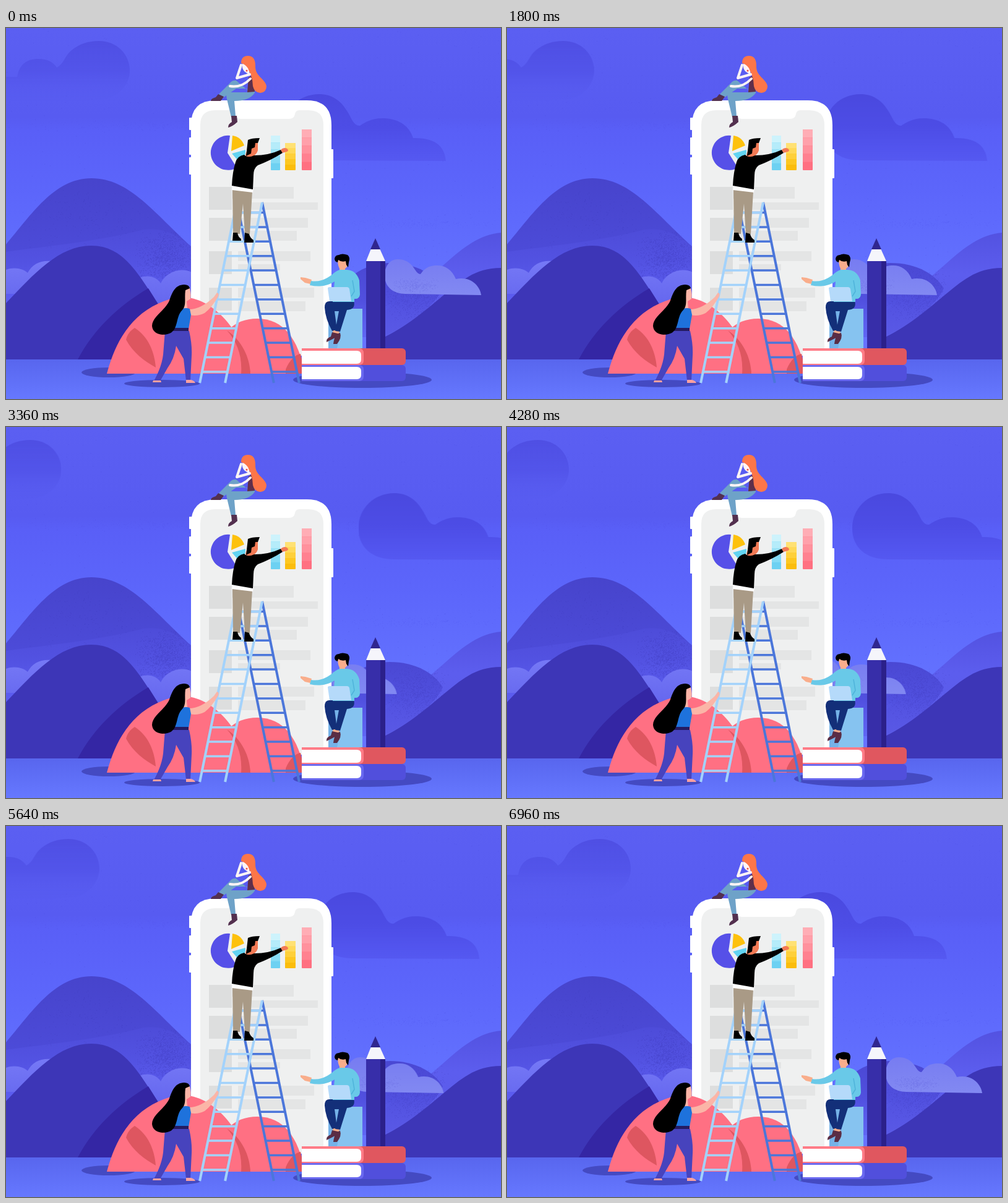
An HTML page that plays this animation: 800x600 px, repeating every 8080 ms.

```html
<!DOCTYPE html>
<html lang="en">
<head>
<meta charset="utf-8">
<title>Building a dashboard</title>
<style>
  html, body { margin: 0; width: 100%; height: 100%; overflow: hidden; background: #5c60f2; }
  svg { display: block; width: 800px; height: 600px; }
</style>
</head>
<body>
<svg id="stage" viewBox="0 0 800 600" xmlns="http://www.w3.org/2000/svg">
  <defs id="defs">
    <clipPath id="backLeftClip"><path d="M0 350C40 303 78 243 138 243C200 243 240 300 300 354V470H0Z"/></clipPath>
    <clipPath id="midRightClip"><path d="M800 331C750 337 722 370 690 397C668 376 600 373 560 402V520H800Z"/></clipPath>
  </defs>

  <rect width="800" height="540" fill="url(#sky)"/>
  <g id="skyGrain"></g>

  <g id="cloudLeft">
    <path fill="url(#leftFade)" d="M-40 118V88C-20 76 2 80 18 79C22 58 34 50 52 50C68 50 77 56 82 64C94 58 94 46 106 36C118 26 133 21 150 21C180 21 200 43 200 69C200 90 184 110 158 115L120 118Z"/>
  </g>
  <g id="cloudRight">
    <path fill="url(#rightFade)" d="M506 107C473 107 448 132 448 164C448 195 471 214 505 214L711 215C709 194 697 177 658 178C651 156 632 146 608 146C590 146 580 153 572 158C561 158 559 146 551 134C541 117 526 107 506 107Z"/>
  </g>

  <!-- back hills -->
  <path fill="url(#backLeft)" d="M0 350C40 303 78 243 138 243C200 243 240 300 300 354V470H0Z"/>
  <path fill="url(#haze)" d="M0 362C80 351 150 345 222 326C250 322 274 332 300 354V540H0Z"/>
  <g id="leftGrain" clip-path="url(#backLeftClip)"></g>
  <path fill="url(#backRight)" d="M800 331C765 334 738 356 712 379C676 411 640 440 600 465V536H800Z"/>
  <path fill="url(#midRight)" d="M526 440C550 398 585 380 620 380C662 380 692 398 706 421C690 455 640 490 600 500H526Z"/>
  <g id="rightGrain" clip-path="url(#midRightClip)"></g>
  <path fill="url(#puff)" d="M0 391C14 386 27 389 35 396C43 381 56 375 75 377L60 430H0Z"/>
  <path fill="url(#puff)" d="M216 404C231 398 245 404 250 413C258 396 280 386 300 395V450H240Z"/>

  <!-- front hills -->
  <path fill="#3d36b7" d="M0 445C45 398 85 352 138 352C190 352 214 398 245 445L300 536H0Z"/>
  <path fill="#3426a4" d="M116 536C140 490 180 450 230 421L245 445L290 536Z"/>
  <path fill="#3d36b7" d="M800 388C757 388 735 410 706 433C680 455 645 485 605 503L565 536H800Z"/>

  <g id="cloudSmall">
    <path fill="url(#smallFade)" d="M633 374C620 374 612 386 612 400C612 419 626 430 646 430L768 432C766 417 751 401 727 406C721 391 710 384 697 384C681 384 675 391 670 398C664 398 662 391 656 384C650 377 642 374 633 374Z"/>
    <g id="smallGrain"></g>
  </g>

  <rect y="536" width="800" height="64" fill="url(#ground)"/>
  <g fill="#444ac2">
    <ellipse cx="166" cy="557" rx="44" ry="8"/>
    <ellipse cx="252" cy="575" rx="61" ry="6"/>
    <ellipse cx="576" cy="569" rx="112" ry="13"/>
  </g>

  <!-- phone -->
  <g fill="#fff">
    <rect x="296" y="145" width="6" height="20" rx="1"/>
    <rect x="296" y="177" width="6" height="28" rx="1"/>
    <rect x="296" y="209" width="6" height="28" rx="1"/>
    <rect x="523" y="196" width="6" height="47" rx="1"/>
    <path d="M299 157Q299 117 339 117H486Q526 117 526 157V530H299Z"/>
  </g>
  <path fill="#eff0f0" d="M314 157Q314 133 338 133H363Q369 133 370 139Q371 147 380 147H457Q466 147 467 139Q468 133 474 133H489Q513 133 513 157V530H314Z"/>
  <g id="rows"></g>

  <!-- pie chart and bars -->
  <path fill="#5650e8" d="M362 174A28 28 0 1 0 373 226L358 202Z"/>
  <path fill="#fdc10d" d="M366 174Q380 176 385 190L364 199Z"/>
  <path fill="#62d3f1" d="M365 203L387 197Q388 209 378 218Z"/>
  <g id="bars"></g>

  <!-- pink hills -->
  <path fill="#ff7083" d="M163 559C176 510 203 452 275 436C330 428 384 490 396 559Z"/>
  <path fill="#ff7083" d="M358 490C370 476 387 470 406 470C450 470 473 505 483 559H380Z"/>
  <g fill="#de5660">
    <path d="M208 485C200 490 196 496 194 504C205 525 224 539 242 549C240 524 230 499 208 485Z"/>
    <path d="M357 489C374 508 382 531 380 559H395C394 529 378 503 357 489Z"/>
    <path d="M452 552C458 537 468 528 476 527L483 559H452Z"/>
  </g>

  <!-- ladder -->
  <g id="ladderBack" stroke="#4b76da" stroke-width="4"></g>
  <g id="ladderFront" stroke="#a3d2fb" stroke-width="4"></g>

  <!-- worker on the ladder -->
  <path fill="#a99a86" d="M366 260L398 264L394 333H386L383 284L378 333H367Z"/>
  <path d="M367 331H374Q375 338 380 341V344H366ZM386 331L393 333Q394 339 400 343V347H385Z"/>
  <path fill="#fff" d="M366 253L400 259L399 266L365 262Z"/>
  <path fill="#f27a55" d="M393 188L407 181V198Q405 204 400 207L389 211L387 205Z"/>
  <path d="M391 181Q397 178 410 178L407 186H403L402 193L397 195L396 203L388 207Z"/>
  <path d="M385 205Q391 211 401 206Q425 206 444 197L447 202Q428 214 407 222Q400 227 400 238L399 261L365 255Q366 232 371 217Q374 207 385 205Z"/>
  <path fill="#f27a55" d="M444 197Q449 192 454 195Q458 198 454 200L447 202Z"/>

  <!-- sitter on the phone -->
  <path fill="#6ea2c8" d="M372 85Q366 84 362 89L344 107L352 112L372 98H390V104H358Q355 106 357 115L364 144L371 142L369 118Q393 118 402 105V99H389Z"/>
  <path fill="#5f2f4b" d="M392 80L399 76L402 103L390 104Z"/>
  <path fill="#53304f" d="M343 107L352 111L347 118H331Q331 114 339 112ZM364 142H373L374 152Q365 160 359 161Q359 155 365 152Z"/>
  <path fill="#fff4f5" d="M382 58L391 56L394 76L388 72Q383 69 382 64Z"/>
  <path fill="#fd7649" d="M380 57Q380 45 391 45Q403 45 403 61C402 78 419 82 421 94Q421 104 411 105Q401 104 399 94Q399 85 396 77L391 65Q386 58 380 57Z"/>
  <path fill="none" stroke="#fff4f5" stroke-width="4" stroke-linecap="round" stroke-linejoin="round" d="M380 60L373 81L394 75M362 94Q381 97 395 82"/>
  <circle cx="389" cy="69" r="1.5" fill="#f0503f"/>

  <!-- helper holding the ladder -->
  <path fill="#4743bd" d="M257 490H296Q301 512 300 530L298 570H291L287 535L275 514Q272 535 261 550L249 571H239Q252 547 254 528Z"/>
  <path fill="#f9a0a0" d="M238 570H250L251 573H237ZM291 569H299Q305 571 306 574H291Z"/>
  <path fill="#fbb5a7" d="M296 455Q315 455 336 435L341 428Q345 429 343 434Q333 452 321 461Q309 467 297 464ZM288 421H297Q300 433 298 438L292 442L293 453H286Z"/>
  <path fill="#1e72dc" d="M278 457Q288 451 297 454L299 464L295 487H270Z"/>
  <path fill="#241b62" d="M271 485H295V490H265Z"/>
  <path d="M297 421Q296 415 288 415C273 415 268 429 264 441C257 457 236 467 236 482C237 494 250 498 261 495C280 491 273 467 285 456C292 449 288 437 290 424Z"/>

  <!-- books -->
  <rect x="478" y="518" width="168" height="27" rx="6" fill="#e0575f"/>
  <path fill="#ff7c87" d="M478 518H570Q578 518 578 526V538Q578 545 570 545H478Z"/>
  <path fill="#fff" d="M478 522H567Q574 522 574 529V536Q574 543 567 543H478Z"/>
  <rect x="478" y="545" width="168" height="26" rx="6" fill="#514fdc"/>
  <path fill="#6a69f0" d="M478 545H570Q578 545 578 552V564Q578 571 570 571H478Z"/>
  <path fill="#fff" d="M478 548H567Q574 548 574 555V561Q574 568 567 568H478Z"/>

  <!-- pencil -->
  <path fill="#372ea9" d="M582 376H605V518H582Z"/>
  <path fill="#2b208a" d="M605 376H613V518H605Z"/>
  <path fill="#f5f5fb" d="M590 357H604L613 377H582Z"/>
  <path fill="#30268f" d="M597 340L605 358H589Z"/>

  <!-- sitter with laptop -->
  <path fill="#86c3f0" d="M521 460Q521 454 528 454H576V518H521Z"/>
  <path fill="#75b2e8" d="M521 465L535 454H548L535 518H521Z"/>
  <path fill="#f9ad8b" d="M527 488L539 489L538 497H530Z"/>
  <path fill="#5a2d45" d="M527 492L536 494Q537 499 528 503L518 508Q517 502 525 499ZM534 495L540 493Q543 501 535 511L529 511Q530 502 534 495Z"/>
  <path fill="#132f79" d="M522 442L562 441Q566 455 551 456L540 491L532 490L538 458H531L535 488L527 490Q516 470 515 452Q515 442 522 442Z"/>
  <path fill="#f9ad8b" d="M536 373H552V383Q551 388 548 389V396H539V389Q536 384 536 373ZM492 414L483 412L476 406V403L484 404L494 407Z"/>
  <path fill="#69c9e8" d="M540 391H551Q566 392 571 408L572 431Q571 439 563 438V443H528L531 410Q514 421 491 416L493 409Q512 412 529 397Q535 392 540 391Z"/>
  <path fill="none" stroke="#4eb2da" stroke-width="1.5" d="M560 408L563 426L558 434"/>
  <path d="M531 373Q532 367 538 367Q543 364 552 367Q557 371 554 379L553 387L550 383L549 377Q542 379 537 375L536 379Q531 378 531 373Z"/>
  <path fill="#b5dafa" d="M520 421Q520 419 523 419H551Q554 419 555 422L558 442H523Z"/>
</svg>
<script>
const NS = 'http://www.w3.org/2000/svg';
const byId = id => document.getElementById(id);

function add(parent, tag, attrs) {
  const el = document.createElementNS(NS, tag);
  for (const key in attrs) el.setAttribute(key, attrs[key]);
  return byId(parent).appendChild(el);
}

// Vertical gradient between two heights; each stop is [offset, colour, opacity].
function fade(id, y1, y2, stops) {
  const g = add('defs', 'linearGradient', { id, gradientUnits: 'userSpaceOnUse', x1: 0, x2: 0, y1, y2 });
  for (const [offset, color, alpha = 1] of stops) {
    const stop = document.createElementNS(NS, 'stop');
    stop.setAttribute('offset', offset);
    stop.setAttribute('stop-color', color);
    stop.setAttribute('stop-opacity', alpha);
    g.append(stop);
  }
}

fade('sky', 0, 536, [[0, '#5b5ff2'], [.27, '#575bf1'], [.31, '#595ff7'], [.5, '#5c66fb'], [.72, '#6270fe'], [1, '#6874ff']]);
fade('leftFade', 21, 118, [[0, '#4f4fe3'], [.5, '#5153e8', .85], [1, '#575aee', 0]]);
fade('rightFade', 107, 215, [[0, '#4a49df'], [.5, '#4d4de6'], [1, '#5457f0', .85]]);
fade('backLeft', 243, 450, [[0, '#4744cc'], [.35, '#4a48d3'], [.65, '#4d4cda'], [1, '#5c5df0']]);
fade('haze', 325, 430, [[0, '#5352e1', .35], [1, '#5c5df0', .7]]);
fade('backRight', 331, 500, [[0, '#5352e1'], [.4, '#5c5dee'], [1, '#5a5ae6']]);
fade('midRight', 380, 500, [[0, '#4a48d3'], [.5, '#5150df'], [1, '#5756e4', .4]]);
fade('puff', 375, 450, [[0, '#7679f6'], [1, '#6466ee']]);
fade('smallFade', 374, 432, [[0, '#777cf1'], [1, '#8289f2']]);
fade('ground', 536, 600, [[0, '#5866ee'], [1, '#6678ff']]);

let seed = 7;
function rnd() {
  seed = (seed * 16807) % 2147483647;
  return seed / 2147483647;
}

// Speckles, either spread evenly or thinning out from the centre.
function grain(parent, cx, cy, rx, ry, count, fill, opacity, soft = true) {
  const spread = () => soft ? rnd() + rnd() - 1 : rnd() * 2 - 1;
  let d = '';
  for (let i = 0; i < count; i++) {
    d += `M${(cx + rx * spread()).toFixed(1)} ${(cy + ry * spread()).toFixed(1)}h1v1h-1z`;
  }
  add(parent, 'path', { d, fill, opacity });
}
grain('skyGrain', 400, 270, 400, 270, 420, '#4243cf', .28, false);
grain('skyGrain', 400, 158, 400, 10, 600, '#5054e8', .4);
grain('skyGrain', 665, 315, 135, 10, 180, '#525af0', .45);
grain('leftGrain', 257, 372, 50, 48, 1200, '#3f3abb', .5);
grain('leftGrain', 130, 305, 110, 55, 180, '#3732ad', .3);
grain('rightGrain', 662, 430, 55, 45, 1000, '#413dbf', .45);
grain('smallGrain', 660, 416, 38, 13, 300, '#5f63dc', .4);

const block = (x, y, right, bottom, fill) =>
  add('rows', 'rect', { x, y, width: right - x, height: bottom - y, fill });
for (const [top, right, y, height, end] of [
  [257, 465, 282, 12, 504], [307, 488, 328, 16, 470],
  [361, 492, 382, 10, 443], [420, 498, 442, 16, 484]
]) {
  block(328, top, 365, top + 37, '#dddede');
  block(375, top, right, top + (top < 300 ? 19 : 16), '#e4e5e5');
  block(375, y, end, y + height, '#e4e5e5');
}
block(364, 257, 376, 276, '#e4e5e5');

for (const [x, y, width, colors] of [
  [428, 174, 15, ['#cdf3fc', '#b5ecfa', '#9de4f8', '#85dbf5', '#6dd1f2']],
  [451, 186, 17, ['#ffe174', '#ffd957', '#fed03a', '#fdc720', '#fbbd0c']],
  [478, 164, 16, ['#ffadb5', '#ffa0aa', '#ff919d', '#ff8190', '#ff7081']]
]) {
  const step = (230 - y) / colors.length;
  add('bars', 'rect', { x, y, width, height: 230 - y, rx: 1, fill: colors[4] });
  colors.forEach((fill, i) => add('bars', 'rect', { x, y: y + i * step, width, height: step - (i === 4 ? 1 : 0), fill }));
}

function ladder(parent, dir) {
  const lean = .205 * dir;
  for (const x of [373, 414]) {
    add(parent, 'line', { x1: x, y1: 282, x2: x + lean * 292, y2: 574 });
  }
  for (let i = 0; i < 12; i++) {
    const y = 298.5 + i * 23.4, shift = lean * (y - 282);
    add(parent, 'line', { x1: 373 + shift, x2: 414 + shift, y1: y, y2: y, 'stroke-width': 3.5 });
  }
}
ladder('ladderBack', 1);
ladder('ladderFront', -1);

// Clouds drift out, rest, drift back and rest, in 40 ms steps.
const loop = 8080;
function drift(id, dx) {
  const near = 'translateX(0px)', far = `translateX(${dx}px)`;
  byId(id).animate([
    { offset: 0, transform: near, easing: 'steps(85)' },
    { offset: 3400 / loop, transform: far },
    { offset: 3960 / loop, transform: far, easing: 'steps(75)' },
    { offset: 6960 / loop, transform: near },
    { offset: 1, transform: near }
  ], { duration: loop, iterations: Infinity });
}
drift('cloudLeft', -112);
drift('cloudRight', 123);
drift('cloudSmall', -138);
</script>
</body>
</html>
```
